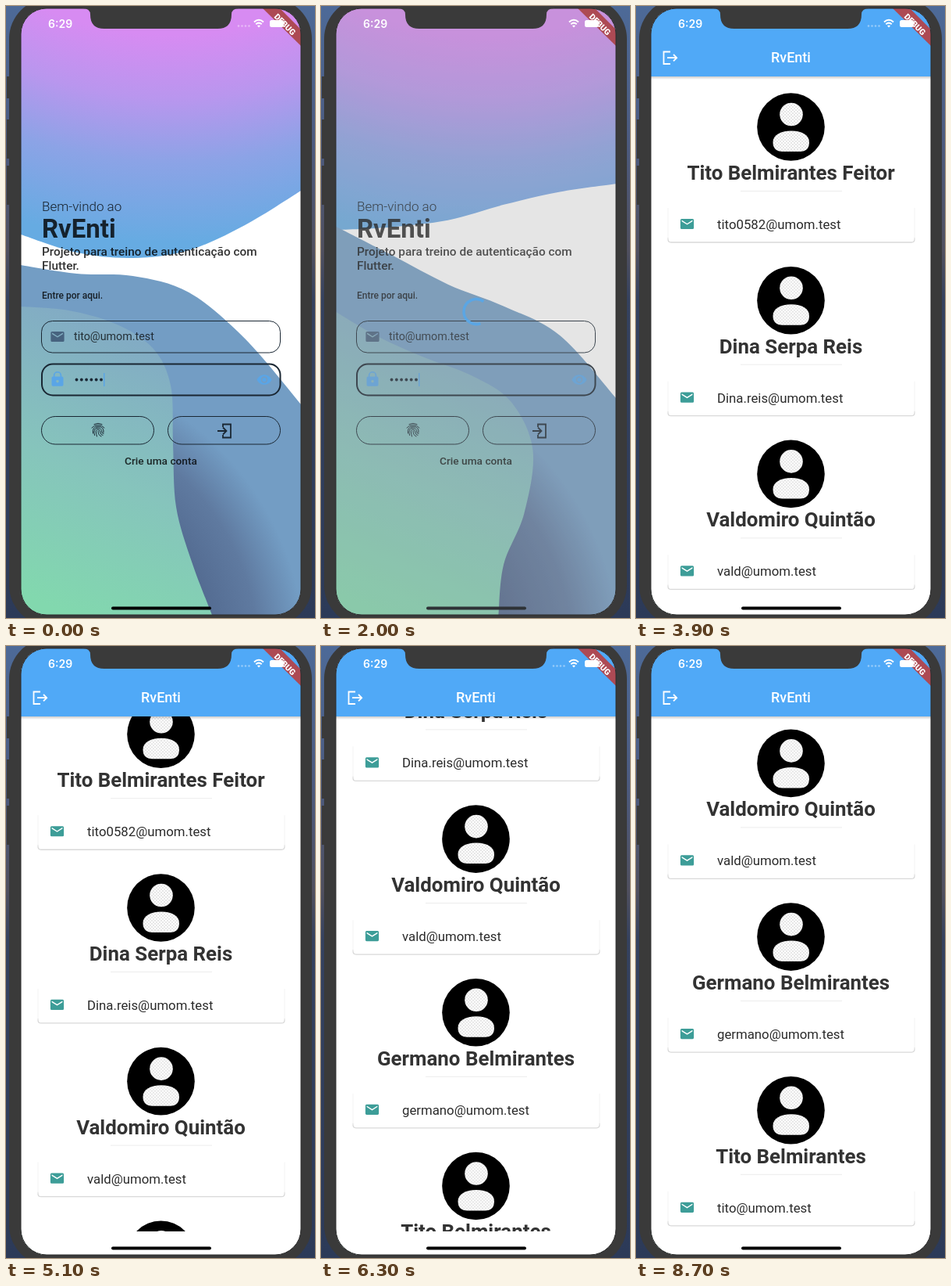
An HTML page for the animation above (8800 ms loop, 396 by 782 pixels).

```html
<!DOCTYPE html>
<html lang="pt">
<head>
<meta charset="utf-8">
<title>RvEnti</title>
<style>
  html, body { margin: 0; width: 100%; height: 100%; overflow: hidden; }
  svg { display: block; width: 100vw; height: 100vh; font-family: Roboto, sans-serif; }
  .mid { text-anchor: middle; }
  .line { fill: none; stroke: currentColor; }
</style>
</head>
<body>
<svg viewBox="0 0 396 782">
  <defs>
    <linearGradient id="desk" x2="0" y2="1">
      <stop stop-color="#4d6a98"/><stop offset=".22" stop-color="#4c5b80"/>
      <stop offset=".4" stop-color="#50505f"/><stop offset=".48" stop-color="#35425f"/>
      <stop offset="1" stop-color="#2c3a58"/>
    </linearGradient>
    <radialGradient id="sky" gradientUnits="userSpaceOnUse" cx="215" cy="-400" r="740">
      <stop offset=".59" stop-color="#d78bf2"/><stop offset=".7" stop-color="#b996ee"/>
      <stop offset=".81" stop-color="#8ca3e6"/><stop offset=".95" stop-color="#66abe2"/>
    </radialGradient>
    <radialGradient id="sea" gradientUnits="userSpaceOnUse" cx="4" cy="833" r="400">
      <stop offset=".6" stop-color="#50678d"/><stop offset=".8" stop-color="#5f7aa0"/><stop offset=".95" stop-color="#739dc4"/>
    </radialGradient>
    <linearGradient id="shore" gradientUnits="userSpaceOnUse" x1="40" y1="760" x2="180" y2="430">
      <stop stop-color="#82d8ae"/><stop offset=".5" stop-color="#86c4bc"/><stop offset="1" stop-color="#82abc4"/>
    </linearGradient>
    <linearGradient id="glass" x1="1" y1="0" x2="0" y2="1">
      <stop stop-color="#e4e4e4"/><stop offset=".5" stop-color="#e0e1e3"/><stop offset="1" stop-color="#d2d7da"/>
    </linearGradient>
    <linearGradient id="fade" x2="0" y2="1"><stop stop-opacity=".2"/><stop offset="1" stop-opacity="0"/></linearGradient>
    <pattern id="check" width="4" height="4" patternUnits="userSpaceOnUse">
      <path fill="#fff" d="M0 0h4v4H0z"/><path fill="#e6e6e6" d="M0 0h2v2H0zM2 2h2v2H2z"/>
    </pattern>
    <clipPath id="screen"><rect x="19" y="3" width="359" height="775" rx="33"/></clipPath>
    <clipPath id="view"><path d="M19 90h359v658H19z"/></clipPath>
    <path id="mail" d="M-7-6.6H7a1.6 1.6 0 0 1 1.6 1.6V5A1.6 1.6 0 0 1 7 6.6H-7A1.6 1.6 0 0 1-8.6 5V-5A1.6 1.6 0 0 1-7-6.6ZM-6.9-4.9V-3.2L0 1.1 6.9-3.2V-4.9L0-.6Z" fill-rule="evenodd"/>
    <path id="lock" fill-rule="evenodd" d="M-5.2-3.4V-5a5.2 5 0 0 1 10.4 0v1.6h.6a1.7 1.7 0 0 1 1.7 1.7V7A1.7 1.7 0 0 1 5.8 8.7H-5.8A1.7 1.7 0 0 1-7.5 7V-1.7A1.7 1.7 0 0 1-5.8-3.4ZM-3.5-3.4H3.5V-5a3.5 3.4 0 0 0-7 0ZM0 .8a1.8 1.8 0 0 0 0 3.6 1.8 1.8 0 0 0 0-3.6Z"/>
    <path id="eye" fill-rule="evenodd" d="M-9.5 0C-7.5-4.3-3.8-6.3 0-6.3S7.5-4.3 9.5 0C7.5 4.3 3.8 6.3 0 6.3S-7.5 4.3-9.5 0ZM0-4.3a4.3 4.3 0 0 0 0 8.6 4.3 4.3 0 0 0 0-8.6ZM0-2.6a2.6 2.6 0 0 1 0 5.2 2.6 2.6 0 0 1 0-5.2Z"/>
  </defs>

  <path fill="url(#desk)" d="M0 0h396v782H0z"/>
  <g fill="#3a3a3a">
    <path d="M1 90h6v28H1zM1 145h6v50H1zM1 204h6v50H1z"/>
    <rect x="4" y="-10" width="388" height="802" rx="52"/>
  </g>

  <g clip-path="url(#screen)">
    <g id="login">
      <path fill="#fff" d="M19 3h359v775H19z"/>
      <path id="top" fill="url(#sky)"/>
      <path id="middle" fill="url(#sea)"/>
      <path id="bottom" fill="url(#shore)"/>
      <g fill-opacity=".8">
        <text x="46" y="262" font-size="17" font-weight="300">Bem-vindo ao</text>
        <text x="46" y="296" font-size="33" font-weight="700">RvEnti</text>
        <g font-size="15.4" font-weight="500">
          <text x="46" y="319">Projeto para treino de autenticação com</text>
          <text x="46" y="337">Flutter.</text>
        </g>
        <text x="46" y="374" font-size="12" font-weight="500">Entre por aqui.</text>
        <text x="87" y="427" font-size="14.3" fill-opacity=".72">tito@umom.test</text>
        <text x="198.5" y="586" class="mid" font-size="13.7" font-weight="500">Crie uma conta</text>
      </g>
      <g class="line" color="#1a2733">
        <rect x="45.5" y="402.5" width="306" height="40.5" rx="14"/>
        <rect id="field" x="46" y="457.5" width="305.5" height="40" rx="14"/>
        <rect x="45.5" y="524.5" width="144" height="35.5" rx="17.7"/>
        <rect x="207.5" y="524.5" width="144" height="35.5" rx="17.7"/>
        <path stroke-width="1.8" d="M271 543h11m-4-4.5 4.5 4.5-4.5 4.5M278 538v-3.5h10v17h-10v-3.5"/>
        <g transform="translate(118 542)" stroke-width="1" stroke-linecap="round">
          <path d="M-5-7.5Q0-10 5-7.5M-8-3Q-5-6.5 0-6.5T8-3M-6.5 4Q-8-4.5 0-4.5T7 3M-4.5 6.5C-7-4 0-2.8 0-2.8S5-2.5 4.7 2Q4.5 4 7 4.5M-1.5 8C-4-.5-2-1 0-1S2.5 1 3 3.5Q3.5 6 6 6.5M0 1Q0 6.5 4 8"/>
        </g>
      </g>
      <use href="#mail" x="66" y="422.5" fill="#47637f"/>
      <g id="icons"><use href="#lock" x="66" y="477"/><use href="#eye" x="331" y="477.5"/></g>
      <g id="dots" fill="#1b2936"></g>
      <path id="caret" fill="#5aa5e6" d="M125 469h1.5v17H125z"/>
      <path id="haze" fill="#9e9e9e" d="M19 3h359v775H19z"/>
      <path id="spinner" fill="none" stroke="#5ba6e4" stroke-width="3.5"/>
      <path id="dim" d="M19 3h359v775H19z"/>
    </g>

    <g id="dialog">
      <rect x="82" y="282" width="234" height="226" rx="11" fill="url(#glass)"/>
      <text x="199.5" y="314" class="mid" font-size="15.5" font-weight="500" letter-spacing="1">Success</text>
      <circle cx="199" cy="384" r="1.1" fill="#6f7a78"/>
      <path stroke="#b2b7bb" d="M82 466.5h234"/>
      <text x="199" y="491.5" class="mid" font-size="12.5" letter-spacing=".4">OK</text>
    </g>

    <g id="page">
      <path fill="#fff" d="M19 3h359v775H19z"/>
      <g clip-path="url(#view)"><g id="list"></g></g>
      <path fill="url(#fade)" d="M19 90h359v4H19z"/>
      <path fill="#50a9f7" d="M19 3h359v87H19z"/>
      <text x="198.5" y="72" class="mid" font-size="18" font-weight="500" fill="#fff">RvEnti</text>
      <path class="line" color="#fff" stroke-width="1.8" d="M44 58.5h-8.500v15.500H44M40 66.200h12m-4-4.200 4.200 4.200-4.200 4.200"/>
    </g>

    <path fill="#ad4a54" d="M329 3h22l27 27v21z"/>
    <g fill="#fff">
      <text x="54" y="28" font-size="14" font-weight="600" style="font-family:Inter,sans-serif">6:29</text>
      <g id="signal"><circle cx="298" cy="25.5" r="1.3"/><circle cx="302.5" cy="25.5" r="1.3"/><circle cx="307" cy="25.5" r="1.3"/><circle cx="311.5" cy="25.5" r="1.3"/></g>
      <path class="line" color="#fff" stroke-width="2" d="M318 20.500q6-5.500 12 0M320.300 23.300q3.700-3.400 7.400 0"/>
      <path d="M322 25.300q2-1.600 4 0l-2 2.200z"/>
      <rect x="338" y="18" width="18" height="9" rx="2.5"/>
      <text class="mid" transform="translate(357 24) rotate(45)" y="3" font-size="10.5" font-weight="900">DEBUG</text>
    </g>
    <rect id="home" x="135" y="767.5" width="128" height="4" rx="2"/>
  </g>
  <rect class="line" color="#2b2b2b" x="19" y="3" width="359" height="775" rx="33"/>
  <path fill="#3a3a3a" d="M98 0V3q10 0 10 8 0 18 18 18H271q18 0 18-18 0-8 10-8V0z"/>
</svg>
<script>
const LOOP = 8800, PITCH = 221.7;
const $ = id => document.getElementById(id);
const set = (id, attrs) => { for (const k in attrs) $(id).setAttribute(k, attrs[k]); };
const clamp = (v, a = 0, b = 1) => Math.min(b, Math.max(a, v));
const ramp = (t, a, b) => clamp((t - a) / (b - a));

// Wave edges at the three moments in POSES
const POSES = [0, 1300, 2800];
const TOP = [[292, 315, 322, 312, 280, 236], [296, 301, 295, 270, 244, 222], [265, 252, 244, 241, 241, 244]];
const MIDDLE = [[331, 342, 345, 366, 425, 509], [297, 338, 369, 388, 419, 500], [267, 281, 318, 365, 428, 507]];
const BOTTOM = [
  [19, 384, 80, 389, 140, 406, 188, 437, 211, 485, 214, 560, 218, 640, 238, 710, 264, 778],
  [19, 397, 70, 415, 130, 437, 190, 458, 234, 488, 254, 545, 246, 630, 230, 700, 234, 778],
  [19, 372, 80, 423, 140, 458, 200, 492, 252, 540, 288, 620, 276, 690, 246, 745, 228, 778]
];
const SCROLL = [[4600, 0], [5600, 136], [6400, 380], [7100, 544], [7800, 448]];
const PEOPLE = [
  ['Tito Belmirantes Feitor', 'tito0582@umom.test'],
  ['Dina Serpa Reis', 'Dina.reis@umom.test'],
  ['Valdomiro Quintão', 'vald@umom.test'],
  ['Germano Belmirantes', 'germano@umom.test'],
  ['Tito Belmirantes', 'tito@umom.test']
];

const person = ([name, mail], i) => `<g transform="translate(0 ${i * PITCH})">
  <circle cx="198.5" cy="154.5" r="43.3"/>
  <g fill="url(#check)"><circle cx="199" cy="138.5" r="14.8"/>
  <path d="M175.5 174C175.5 165 185 159.5 199 159.5S222 165 222 174Q222 186 210 186H188Q175.5 186 175.5 174Z"/></g>
  <text x="198.5" y="222" class="mid" font-size="25.9" font-weight="700" fill="#333">${name}</text>
  <path stroke="#ececec" d="M134 236.5H264"/>
  <path fill="none" stroke="#d9d9d9" stroke-width="1.3" d="M41 296v2q0 4 4 4H353q4 0 4-4v-2"/>
  <path stroke="#f3f3f3" d="M41 258v40M357 258v40"/>
  <use href="#mail" x="65.5" y="278.5" fill="#3d9d98"/>
  <text x="104" y="285" font-size="16.8" fill="#2b2b2b">${mail}</text></g>`;
$('list').innerHTML = PEOPLE.map(person).join('');
$('dots').innerHTML = Array.from({ length: 6 }, (_, i) => `<circle cx="${90.5 + i * 6.3}" cy="477.5" r="1.9"/>`).join('');

// Parabola through the three poses
function blend(poses, t) {
  const weights = POSES.map((p, i) => POSES.reduce((w, q, j) => j === i ? w : w * (t - q) / (p - q), 1));
  return poses[0].map((_, k) => weights.reduce((sum, w, i) => sum + w * poses[i][k], 0));
}

function smooth(pts) {
  let d = 'M' + pts[0];
  for (let i = 0; i < pts.length - 1; i++) {
    const a = pts[i], b = pts[i + 1], before = pts[i - 1] || a, after = pts[i + 2] || b;
    const c1 = a.map((v, k) => v + (b[k] - before[k]) / 6);
    const c2 = b.map((v, k) => v - (after[k] - a[k]) / 6);
    d += `C${c1} ${c2} ${b}`;
  }
  return d;
}
const across = ys => smooth(ys.map((y, i) => [19 + i * 71.8, y]));
const pairs = list => list.flatMap((v, i) => i % 2 ? [] : [[v, list[i + 1]]]);

function slope(i) {
  const [a, b, c] = [SCROLL[i - 1], SCROLL[i], SCROLL[i + 1]];
  if (!a || !c || (b[1] - a[1]) * (c[1] - b[1]) <= 0) return 0;
  return (c[1] - a[1]) / (c[0] - a[0]);
}
function scrollAt(t) {
  t = clamp(t, SCROLL[0][0], SCROLL.at(-1)[0]);
  const i = Math.max(1, SCROLL.findIndex(k => k[0] >= t));
  const [t0, y0] = SCROLL[i - 1], [t1, y1] = SCROLL[i];
  const h = t1 - t0, u = (t - t0) / h, v = 1 - u;
  return v * v * (1 + 2 * u) * y0 + u * u * (3 - 2 * u) * y1 + h * u * v * (v * slope(i - 1) - u * slope(i));
}

function arc(ms) {
  const point = deg => [199 + 16 * Math.cos(deg * Math.PI / 180), 390.5 + 16 * Math.sin(deg * Math.PI / 180)];
  const start = -90 + ms * .2, sweep = 10 + 125 * (1 - Math.cos(ms / 1333 * 2 * Math.PI));
  return `M${point(start)}A16 16 0 ${+(sweep > 180)} 1 ${point(start + sweep)}`;
}

function draw(t) {
  const wave = Math.min(t, 3200), focused = t < 2500, loading = t >= 1100 && focused;
  set('top', { d: across(blend(TOP, wave)) + 'V3H19Z' });
  set('middle', { d: across(blend(MIDDLE, wave)) + 'V778H19Z' });
  set('bottom', { d: smooth(pairs(blend(BOTTOM, wave))) + 'H19Z' });

  set('field', { 'stroke-width': focused ? 2 : 1 });
  set('icons', { fill: focused ? '#5aa5e6' : '#47637f' });
  set('caret', { opacity: +(focused && t % 1000 < 500) });
  set('haze', { opacity: loading ? .27 * ramp(t, 1000, 1250) : 0 });
  set('spinner', { d: arc(t - 1200), opacity: +(loading && t >= 1200) });
  set('signal', { opacity: loading ? 0 : .4 });

  const shown = ramp(t, 2500, 2750) * (1 - ramp(t, 3450, 3600));
  set('dim', { opacity: .45 * shown });
  set('dialog', { opacity: shown });
  set('home', { fill: shown > .5 ? '#69747a' : loading ? '#2e3236' : '#000' });

  const push = 1 - (1 - ramp(t, 3450, 3850)) ** 3;
  set('login', { transform: `translate(${-120 * push} 0)` });
  set('page', { transform: `translate(${360 * (1 - push)} 0)` });
  set('list', { transform: `translate(0 ${-scrollAt(t)})` });
}

const begin = performance.now();
(function tick() {
  draw((performance.now() - begin) % LOOP);
  requestAnimationFrame(tick);
})();
</script>
</body>
</html>
```
